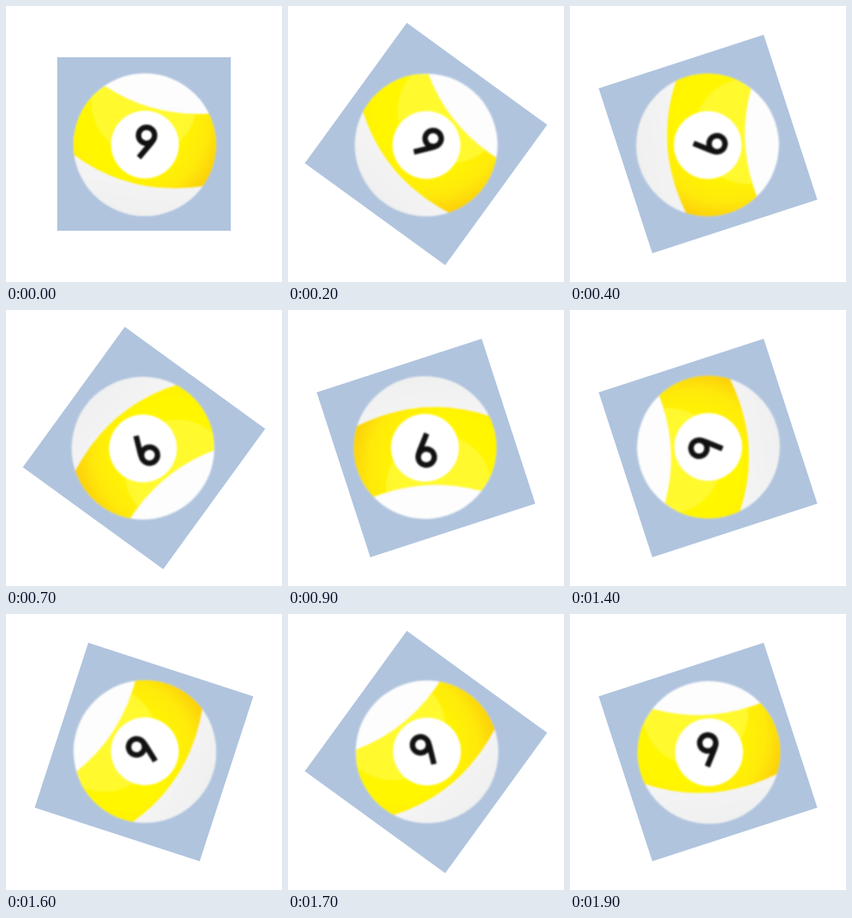
An HTML page for the animation above (2000 ms loop, 377 by 377 pixels).

```html
<!DOCTYPE html>
<html lang="en">
<head>
<meta charset="utf-8">
<title>Rolling nine ball</title>
<style>
  html, body { margin: 0; width: 100%; height: 100%; overflow: hidden; background: #fff; }
  svg { display: block; width: 100%; height: 100%; }
</style>
</head>
<body>
<svg viewBox="0 0 377 377" role="img" aria-label="Nine ball">
  <defs>
    <clipPath id="ball"><circle cx="189.5" cy="189.5" r="97.5"/></clipPath>
    <clipPath id="band">
      <path d="M135 109.5Q200 152 278 147L300 200L270 246Q170 261 91 202L80 150Z"/>
    </clipPath>
    <radialGradient id="gold" gradientUnits="userSpaceOnUse" cx="165" cy="155" r="138">
      <stop offset=".5" stop-color="#fff600"/>
      <stop offset=".8" stop-color="#ffea0a"/>
      <stop offset="1" stop-color="#fccf0a"/>
    </radialGradient>
    <linearGradient id="white" gradientUnits="userSpaceOnUse" x1="205" y1="92" x2="175" y2="287">
      <stop offset=".2" stop-color="#fdfdfd"/>
      <stop offset=".7" stop-color="#f4f4f4"/>
      <stop offset="1" stop-color="#f0f0f0"/>
    </linearGradient>
    <filter id="soft" x="-5%" y="-5%" width="110%" height="110%" color-interpolation-filters="sRGB">
      <feGaussianBlur stdDeviation=".9"/>
    </filter>
  </defs>
  <g id="spin">
    <rect x="70" y="70" width="237" height="237" fill="#b0c4de"/>
    <g filter="url(#soft)">
      <g clip-path="url(#ball)">
        <rect x="90" y="90" width="200" height="200" fill="url(#white)"/>
        <g clip-path="url(#band)">
          <rect x="90" y="90" width="200" height="200" fill="url(#gold)"/>
          <circle cx="188.5" cy="132" r="72" fill="#fffb3a" opacity=".8"/>
        </g>
      </g>
      <circle cx="189.8" cy="189.3" r="46.3" fill="#fff"/>
      <g fill="none" stroke="#111" stroke-width="7.4">
        <circle cx="192" cy="176.7" r="11"/>
        <path d="M202.3 180.5Q201 184 198 187.5L181.5 207"/>
      </g>
    </g>
  </g>
</svg>
<script>
  const LOOP = 2000, STEP = 100, TURN = 18;
  const spin = document.getElementById("spin");
  const start = performance.now();

  function draw(ms) {
    const angle = Math.floor(ms / STEP) * TURN;
    spin.setAttribute("transform", `rotate(${angle} 188.5 188.5)`);
  }

  function tick() {
    draw((performance.now() - start) % LOOP);
    requestAnimationFrame(tick);
  }

  tick();
</script>
</body>
</html>
```
